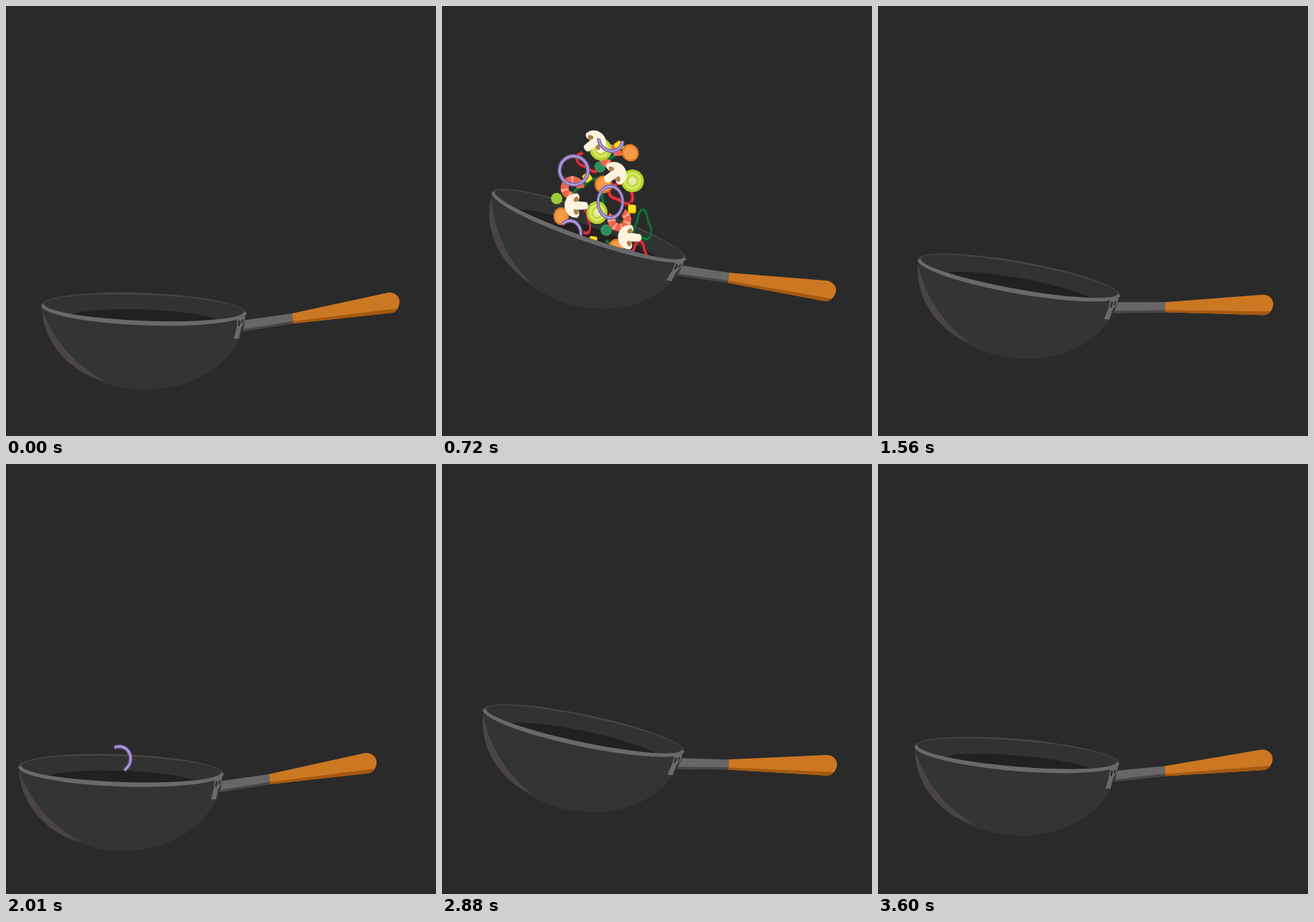
An HTML page with a canvas for the animation above (3630 ms loop, 600 px wide and 600 px high).

```html
<!DOCTYPE html>
<html lang="en">
<head>
<meta charset="utf-8">
<title>Wok toss</title>
<style>
html, body { margin: 0; width: 100%; height: 100%; overflow: hidden; background: #2a2a2a; }
canvas { display: block; width: 600px; height: 600px; }
</style>
</head>
<body>
<canvas id="stage" width="600" height="600"></canvas>
<script>
const ctx = document.getElementById('stage').getContext('2d');
const LOOP = 3630, TOSS = 1830, STEP = 30, TAU = Math.PI * 2;
const PIECES = 54;

// time, rim centre x, rim centre y, tilt in degrees
const POSES = [
  [0, 192.5, 421.5, 2.2], [180, 160.5, 426, 2], [330, 160, 346, 12],
  [480, 199.5, 259.5, 21.4], [600, 207, 279, 21.6], [1050, 198, 370.5, 11.8],
  [1450, 198, 369, 11.8], [1770, 194, 404.5, 4.8], [1830, 192.5, 421.5, 2.2]
];

function spline(keys, t, col) {
  let i = 0;
  while (i < keys.length - 2 && t >= keys[i + 1][0]) i++;
  const slope = k => {
    const a = keys[Math.max(k - 1, 0)], b = keys[Math.min(k + 1, keys.length - 1)];
    return (b[col] - a[col]) / (b[0] - a[0]);
  };
  const a = keys[i], b = keys[i + 1], d = b[0] - a[0], u = (t - a[0]) / d, v = 1 - u;
  return a[col] * v * v * (1 + 2 * u) + b[col] * u * u * (3 - 2 * u)
    + d * u * v * (slope(i) * v - slope(i + 1) * u);
}

function fill(color) { ctx.fillStyle = color; ctx.fill(); }

function stroke(color, width) {
  ctx.strokeStyle = color;
  ctx.lineWidth = width;
  ctx.stroke();
}

function disc(r, color) {
  ctx.beginPath();
  ctx.arc(0, 0, r, 0, TAU);
  fill(color);
}

function shape(d, color) { ctx.fillStyle = color; ctx.fill(new Path2D(d)); }

function pepper(size, end, dark, light) {
  ctx.beginPath();
  for (let a = 0; a <= end; a += .1) {
    const r = size * (1 + .2 * Math.cos(3 * a));
    ctx.lineTo(r * Math.cos(a), r * Math.sin(a));
  }
  stroke(dark, 5.5);
  stroke(light, 1.2);
}

// each kind has a flattening for its tumble and a drawing; early ones lie on top
const KINDS = [
  { flat: .88, draw(n) {
    ctx.beginPath();
    ctx.arc(0, 0, 18 + n % 3 * 2, -.8, n % 3 ? TAU - .8 : 2.2);
    stroke('#7d66ae', 5.5);
    stroke('#bdaade', 1.8);
  } },
  { flat: 1, draw() {
    shape('M-17 2C-18-9-9-16 0-16S18-9 17 2Q13 7 6 3L5 15Q0 19-5 15L-6 3Q-13 7-17 2Z', '#fdf3de');
    shape('M-13 1Q-9-6-5-2L-6 3Q-10 5-13 1ZM13 1Q9-6 5-2L6 3Q10 5 13 1Z', '#a9834a');
  } },
  { flat: 1, draw() {
    ctx.beginPath();
    ctx.roundRect(-6, -5.5, 12, 11, 2.5);
    fill('#f2b90c');
    ctx.beginPath();
    ctx.roundRect(-4, -5.5, 10, 10, 2.5);
    fill('#ffe01c');
  } },
  { flat: .95, draw() {
    disc(16, '#b4d12f');
    disc(12.5, '#d7e660');
    disc(8.5, '#bcd63c');
    disc(6, '#e4eda0');
  } },
  { flat: .92, draw() {
    disc(12.5, '#e07a24');
    disc(10, '#f39a45');
  } },
  { flat: 1, draw() {
    ctx.beginPath();
    ctx.arc(0, 0, 11, .5, 5.3);
    stroke('#f0644a', 11);
    for (let a = .9; a < 5; a += .9) {
      ctx.beginPath();
      ctx.arc(0, 0, 11, a, a + .25);
      stroke('#f9a48c', 11);
    }
  } },
  { flat: .75, draw: n => pepper(16, n % 2 ? TAU : 3.2, '#c41e28', '#e8545a') },
  { flat: .75, draw: n => pepper(20, n % 3 ? TAU : 3, '#07602f', '#2f8a49') },
  { flat: 1, draw: n => disc(8, n % 2 ? '#9ccc33' : '#2d8f5c') }
];

// depth runs from the top of the tossed column (0) to its foot (1)
function place(i, t) {
  const depth = i / (PIECES - 1), early = Math.max(0, 330 - t);
  const side = 2 * ((i * .618 + .5) % 1) - 1;
  const width = 25 + 42 * Math.sin(Math.PI * depth);
  const drift = 26 + 40 * Math.tanh((t - 550) / 90);
  const peak = 520 - 64 * depth;
  const fall = .003 * ((t - peak) ** 2 - (480 - peak) ** 2);
  const lag = .004 * Math.min(1, depth * 40) * early * early;
  return [155 + 100 * (depth - .4) ** 2 + side * width + drift, 70 + 168 * depth + fall + lag];
}

function drawFood(t) {
  for (let k = KINDS.length - 1; k >= 0; k--) {
    const { flat, draw } = KINDS[k];
    for (let i = k, n = 0; i < PIECES; i += KINDS.length, n++) {
      ctx.save();
      ctx.translate(...place(i, t));
      ctx.rotate(n * 1.9 + (n % 2 ? -1 : 1) * (t - 480) / 260);
      ctx.scale(1, flat + (1 - flat) * Math.cos(n * 2 + t / 150));
      draw(n);
      ctx.restore();
    }
  }
}

function atWok([x, y, tilt], draw) {
  ctx.save();
  ctx.translate(x, y);
  ctx.rotate(tilt * Math.PI / 180);
  draw();
  ctx.restore();
}

function opening() { ctx.ellipse(0, -.4, 139.5, 18.2, 0, 0, TAU); }

// area between a lower half ellipse and the front edge of the opening
function frontBand(y, rx, ry, color) {
  ctx.beginPath();
  ctx.ellipse(0, y, rx, ry, 0, 0, Math.PI);
  ctx.ellipse(0, -.4, 139.5, 18.2, 0, Math.PI, 0, true);
  ctx.closePath();
  fill(color);
}

function drawBack() {
  ctx.beginPath();
  ctx.ellipse(0, 1.5, 143.5, 22.5, 0, 0, TAU);
  fill('#4a4444');
  ctx.beginPath();
  opening();
  fill('#313333');
  ctx.save();
  ctx.clip();
  ctx.beginPath();
  ctx.ellipse(2, 18, 110, 16, 0, 0, TAU);
  fill('#212121');
  ctx.restore();
}

function drawFront() {
  // arm and grip
  shape('M136 12.3L207-.4 208.5 13.5 138.6 27.2Z', '#676767');
  shape('M137 24.5L208 10.5 208.5 13.5 138.6 27.2Z', '#4a4444');
  shape('M206.5-.4L339.4-34.6C350-36 356-29 356-22S352-7.5 345-6.5L209 13.5Z', '#cc7722');
  shape('M208.5 10.5L353-13Q350-7.5 345-6.5L209 13.5Z', '#a5590f');

  // bowl
  frontBand(0, 142.5, 114, '#333434');
  shape('M-142 8C-138 55-98 95-50.6 103.5C-94 83-124 48-138 16Z', '#4a4444');

  // bracket
  shape('M130.9 8.5L141.8 6 140.2 16 136.5 22.3 134 37.4 127 37.7 130.4 21.5Z', '#6a6a6a');
  shape('M132.5 12h3l-1 8h-2.500ZM137.5 10.500h2l-1 6h-2Z', '#2f2f2f');

  frontBand(1.5, 143.5, 22.5, '#6a6a6a');
}

function render(time) {
  const t = Math.floor(time % LOOP / STEP) * STEP % TOSS;
  const pose = [1, 2, 3].map(col => spline(POSES, t, col));
  ctx.fillStyle = '#2a2a2a';
  ctx.fillRect(0, 0, 600, 600);
  atWok(pose, drawBack);
  if (t > 120 && t < 930) {
    ctx.save();
    // food shows only above the rim or through the opening
    atWok(pose, () => {
      ctx.beginPath();
      ctx.rect(-700, -900, 1400, 900);
      opening();
    });
    ctx.clip();
    drawFood(t);
    ctx.restore();
  }
  atWok(pose, drawFront);
}

const start = performance.now();
function tick() {
  render(performance.now() - start);
  requestAnimationFrame(tick);
}
tick();
</script>
</body>
</html>
```
